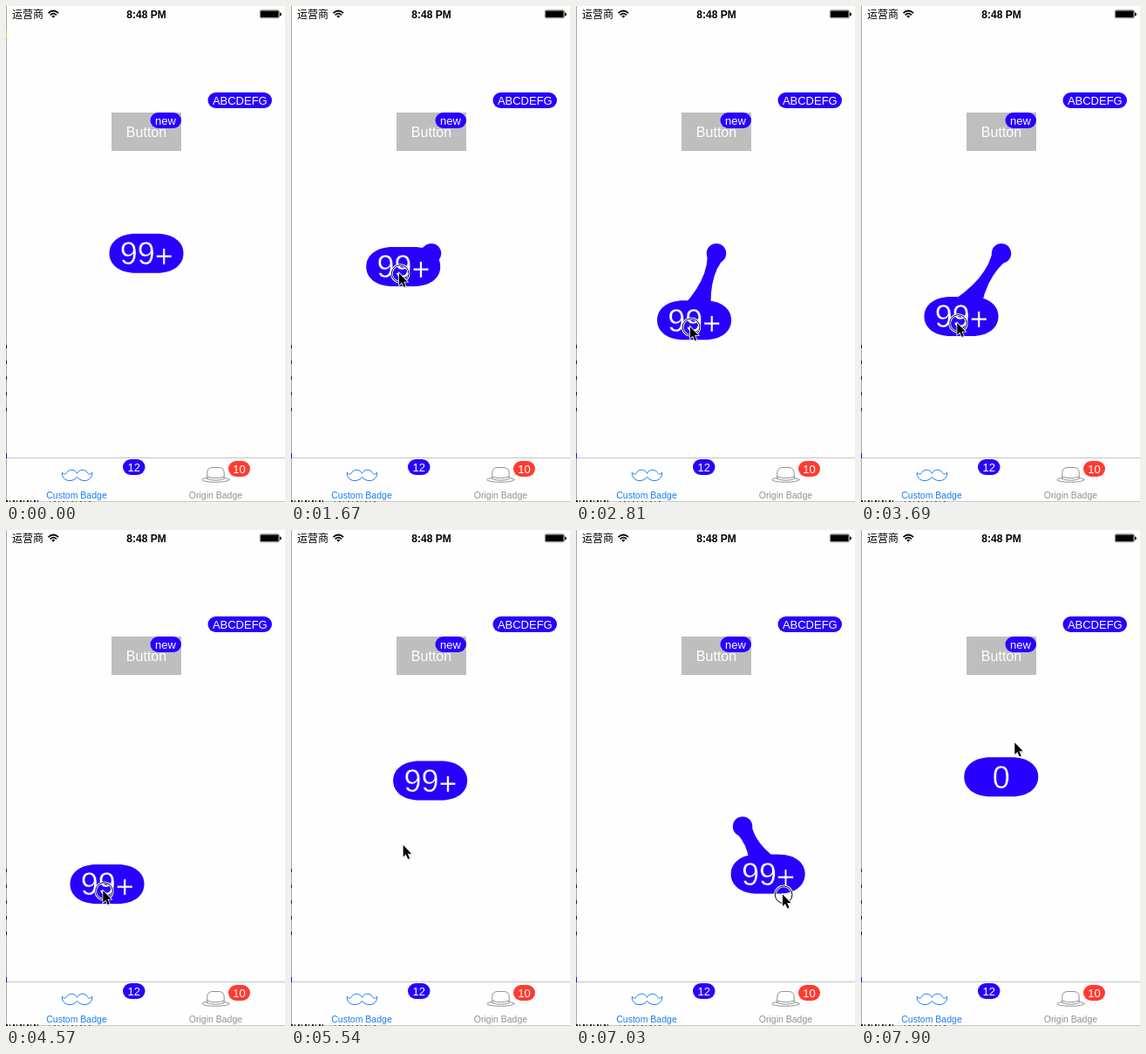
An HTML page that plays this animation: 320x568 px, repeating every 7990 ms.

```html
<!DOCTYPE html>
<html lang="en">
<head>
<meta charset="utf-8">
<title>Draggable badge</title>
<style>
  html, body { margin: 0; width: 100%; height: 100%; overflow: hidden; background: #fefefe; }
  svg { display: block; width: 100vw; height: 100vh; }
  text { font-family: "Liberation Sans", Arial, sans-serif; text-anchor: middle; }
  .badge { fill: #2800ff; }
  .small { font-size: 13px; fill: #fff; }
  .tab { font-size: 10.5px; }
  .line { fill: none; stroke-linejoin: round; stroke-linecap: round; }
</style>
</head>
<body>
<svg viewBox="0 0 320 568">
  <rect width="320" height="568" fill="#fefefe"/>

  <g id="status">
    <text x="25" y="13.5" font-size="12" style="font-family:'Noto Sans CJK SC','Noto Sans CJK',sans-serif">运营商</text>
    <g fill="none" stroke="#000" stroke-width="1.7">
      <path d="M48.5 8.2Q54.3 2.8 60.1 8.2"/>
      <path d="M50.6 10.3Q54.3 6.9 58 10.3"/>
    </g>
    <path d="M52.3 11.6Q54.3 9.9 56.3 11.6L54.3 13.7Z"/>
    <text x="161" y="13.5" font-size="12" font-weight="700">8:48 PM</text>
    <rect x="291.3" y="4.8" width="22" height="9" rx="1.6" fill="none" stroke="#000" stroke-width=".5"/>
    <rect x="292" y="5.5" width="20.6" height="7.6" rx=".8"/>
    <path d="M314 7.5q2 0 2 2t-2 2z"/>
  </g>

  <rect x="121" y="122" width="80" height="44" fill="#bebebe"/>
  <text x="161" y="150" font-size="16" fill="#fff">Button</text>
  <rect class="badge" x="165.5" y="122" width="35.5" height="18" rx="9"/>
  <text class="small" x="183" y="135.8">new</text>
  <rect class="badge" x="231.5" y="99" width="73.5" height="18" rx="9"/>
  <text class="small" x="268.3" y="112.6">ABCDEFG</text>

  <g id="tabs">
    <rect y="517" width="320" height="1" fill="#c4c4c4"/>
    <g id="mustache" class="line" stroke="#1a7cf5">
      <path id="half" d="M81.5 535C79 530 72 530 69.5 534.5C68.5 537 66 536.5 64.3 534.2C64 540 68 543.6 73 543.6C77 543.6 80 541.5 81.5 539.5"/>
      <use href="#half" transform="matrix(-1 0 0 1 163 0)"/>
    </g>
    <text class="tab" x="81" y="563.7" fill="#1a7cf5">Custom Badge</text>
    <g id="hat" class="line" stroke="#929292">
      <ellipse cx="240.5" cy="542.5" rx="15.8" ry="2.8"/>
      <path d="M230.8 541.5V535Q230.8 528.5 237 528.5H244Q250.2 528.5 250.2 535V541.5Q240.5 545 230.8 541.5Z" fill="#fefefe"/>
      <path d="M230.8 539Q240.5 542.5 250.2 539"/>
    </g>
    <text class="tab" x="240.5" y="563.7" fill="#929292">Origin Badge</text>
    <rect class="badge" x="134" y="519" width="25.5" height="18" rx="9"/>
    <text class="small" x="146.7" y="532.7">12</text>
    <rect x="255" y="521" width="25" height="18" rx="9" fill="#ff3b30"/>
    <text class="small" x="267.5" y="534.8">10</text>
  </g>

  <g id="edge">
    <rect width="1" height="568" fill="#a8a8a8"/>
    <path d="M.5 388V465" stroke="#222" stroke-dasharray="4 14"/>
    <rect y="512" width="1" height="6" fill="#2418b0"/>
    <rect id="spot" y="28" width="1" height="9" fill="#e3d24a"/>
    <rect y="567" width="320" height="1" fill="#c8c8c8"/>
    <path d="M0 567H37" stroke="#222" stroke-width="2" stroke-dasharray="2 2 1 3"/>
    <path d="M50 567.5H98" stroke="#555" stroke-dasharray="1 4 2 3"/>
  </g>

  <g id="tail" class="badge">
    <circle id="anchor" r="11.25"/>
    <path id="neck"/>
  </g>
  <g id="bubble">
    <path class="badge" d="M-12-22.5H12C31-22.5 42.5-13 42.5 0S31 22.5 12 22.5H-12C-31 22.5-42.5 13-42.5 0S-31-22.5-12-22.5Z"/>
    <g font-size="36" fill="#fff" stroke="#2800ff" stroke-width=".4">
      <text id="full" x=".3" y="13">99<tspan dy="3">+</tspan></text>
      <text id="empty" y="13">0</text>
    </g>
  </g>
  <g id="pointer">
    <g id="ring" fill="none">
      <circle cx="2" cy="1" r="9.8" stroke="#fff" stroke-width="2.6"/>
      <circle cx="2" cy="1" r="9.8" stroke="#000"/>
    </g>
    <g transform="translate(.8 .5) scale(.93)">
      <path d="M1 2V16L4.3 13 7 18.5 9.4 17.5 7 12H12Z" opacity=".18"/>
      <path d="M0 0V14.5L3.3 11.5 5.8 17.2 8.1 16.2 5.6 10.6H10.2Z" stroke="#fff" stroke-width="1.6" paint-order="stroke"/>
    </g>
  </g>
</svg>
<script>
const LOOP = 7990, START = 540, STEP = 87.7;
const HOME = [161, 283.25], ANCHOR_R = 11.25, BUBBLE_R = 22.5;

// Bubble way points are [time, x, y]; grip is the pointer's offset from its centre.
const drags = [
  { snap: 4280, grip: [-5.5, 7], path: [
    [1150, ...HOME], [1670, 129, 298], [1940, 122, 309], [2810, 135, 360],
    [3200, 157, 347], [3690, 115, 355], [4570, 116, 405.5], [5383, 117, 405]] },
  { snap: 6979, grip: [16, 22.7], path: [
    [6070, ...HOME], [6330, 187, 305], [7022, 220, 393.5], [7392, 228, 417]] }
];
for (const d of drags) {
  d.press = d.path[0][0];
  d.release = d.path[d.path.length - 1][0];
  d.end = d.path[d.path.length - 1].slice(1);
}

const el = id => document.getElementById(id);
const show = (id, on) => el(id).setAttribute("visibility", on ? "visible" : "hidden");
const place = (id, p) => el(id).setAttribute("transform", `translate(${p[0]} ${p[1]})`);
const clamp = v => Math.max(0, Math.min(1, v));
const mix = (a, b, k) => [a[0] + (b[0] - a[0]) * k, a[1] + (b[1] - a[1]) * k];
const add = (a, b) => [a[0] + b[0], a[1] + b[1]];

function follow(path, t) {
  const next = path.findIndex(k => k[0] > t);
  if (next <= 0) return path[next ? path.length - 1 : 0].slice(1);
  const a = path[next - 1], b = path[next];
  return mix(a.slice(1), b.slice(1), (t - a[0]) / (b[0] - a[0]));
}

// The free pointer comes in, goes back for a second grab, then leaves.
const [first, second] = drags;
const freePath = [
  [START, 259, 372], [980, 164, 293],
  [first.release, ...add(first.end, first.grip)], [5540, 128, 360],
  [second.press, ...add(HOME, second.grip)],
  [second.release, ...add(second.end, second.grip)], [7900, 175.5, 243]
];
const freePointer = t => t < first.press ? follow(freePath.slice(0, 2), t) : follow(freePath, t);

function spring(ms) {
  const s = ms / 1000, w = 33;
  return Math.exp(-10 * s) * (Math.cos(w * s) + 10 / w * Math.sin(w * s));
}

function neckPath(a, b) {
  const dx = b[0] - a[0], dy = b[1] - a[1], d = Math.hypot(dx, dy);
  if (d < 1) return "";
  const off = (p, r) => add(p, [dy / d * r, -dx / d * r]).join(" ");
  const waist = mix(a, b, 0.38), bulge = Math.max(-4, 14 * (1 - d / 65));
  return `M${off(a, ANCHOR_R)}Q${off(waist, bulge)} ${off(b, BUBBLE_R)}` +
    `L${off(b, -BUBBLE_R)}Q${off(waist, -bulge)} ${off(a, -ANCHOR_R)}Z`;
}

function render(t) {
  const drag = drags.filter(d => t >= d.press).pop();
  const held = !!drag && t < drag.release;
  let bubble = HOME;
  if (held) bubble = follow(drag.path, t);
  else if (drag) bubble = mix(HOME, drag.end, spring(t - drag.release));
  place("bubble", bubble);

  // Stretched too far, the anchor slides into the bubble.
  const merge = held ? clamp((t - drag.snap) / 100) : 1;
  show("tail", merge < 1);
  const anchor = mix(HOME, bubble, merge);
  place("anchor", anchor);
  el("neck").setAttribute("d", neckPath(anchor, bubble));

  place("pointer", held ? add(bubble, drag.grip) : freePointer(t));
  show("pointer", t >= START);
  show("ring", held);
  show("spot", t < first.press);
  show("full", t < second.release);
  show("empty", t >= second.release);
}

// The picture advances in even steps after an opening pause.
function tick() {
  const t = performance.now() % LOOP;
  const n = Math.floor((t - START + 10) / STEP);
  render(n < 0 ? 0 : START + n * STEP);
  requestAnimationFrame(tick);
}
tick();
</script>
</body>
</html>
```
